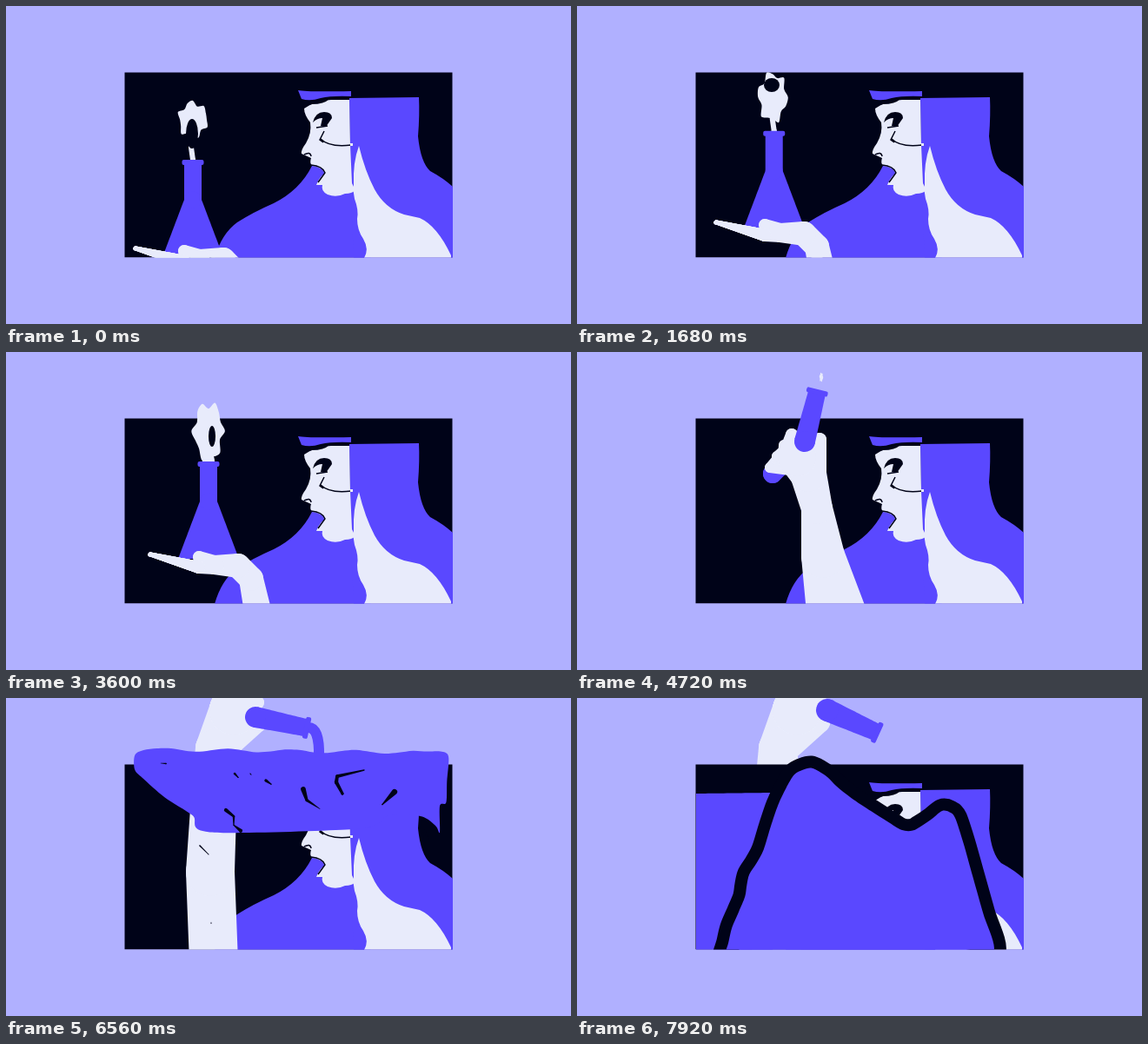
An HTML page with a canvas that plays this animation: 650x366 px, repeating every 8000 ms.

```html
<!DOCTYPE html>
<html lang="en">
<head>
<meta charset="utf-8">
<title>Potion</title>
<style>
html, body { margin: 0; width: 100%; height: 100%; overflow: hidden; background: #b0b0ff; }
canvas { display: block; }
</style>
</head>
<body>
<canvas id="stage" width="650" height="366"></canvas>
<script>
const ctx = document.getElementById('stage').getContext('2d');
const BG = '#b0b0ff', DARK = '#000318', PURPLE = '#5a48ff', LIGHT = '#e8ebfb';
const LOOP = 8000, STEP = 80;
const BOTTOM = 289.5;

// The woman never moves.
const woman = [
  [PURPLE, 'M240 290Q248 262 266 249Q285 237 308 227Q338 212 352 184L362 180 400 200 420 290Z'],
  [PURPLE, 'M395 106L475 105Q476 125 474 150Q477 180 488 190Q503 198 514 208V290H400L396 204Z'],
  [LIGHT, 'M343 118Q358 108 374 108H395L396 160 398 204 402 212Q398 216 390 216Q380 221 370 217Q362 213 364 206L357 206Q360 198 366 193Q366 186 352 184Q349 180 351 175L340 170Q339 166 345 158Q352 146 350 134Q343 125 343 118Z'],
  [LIGHT, 'M406 161Q413 190 424 211Q436 233 458 240L476 244Q496 253 512 287V290H412Q418 280 411 268Q404 258 404 245Q406 235 401 222Q399 214 400 205Q399 180 406 161Z'],
  [DARK, 'M341 116Q344 108 362 106L372 107Q366 113 352 113Z'],
  [PURPLE, 'M336 97Q345 99 397 98V104Q375 103 362 106Q350 110 340 107Z'],
  [DARK, 'M353 134Q356 122 366 122Q375 122 375 129L368 139 362 138 364 129Q358 129 353 134Z']
].map(([color, d]) => [color, new Path2D(d)]);
const lines = new Path2D('M357 140L370 138M366 144L361 154 365 157M362 153Q372 163 397 160M343 171Q350 167 351 173M351 183Q364 184 367 192L359 203');

const mix = (a, b, f) => a.map((v, i) => v + (b[i] - v) * f);
const unit = v => Math.max(0, Math.min(1, v));

function pose(times, shapes, t) {
  let i = 0;
  while (i < times.length - 2 && t >= times[i + 1]) i++;
  return mix(shapes[i], shapes[i + 1], unit((t - times[i]) / (times[i + 1] - times[i])));
}

// Smooth closed curve through [x, y] points; bend 0 gives straight sides.
function blob(pts, color, bend = 0.15) {
  const n = pts.length, at = i => pts[(i + n) % n];
  ctx.beginPath();
  ctx.moveTo(...pts[0]);
  pts.forEach((p, i) => {
    const q = at(i + 1), before = at(i - 1), after = at(i + 2);
    ctx.bezierCurveTo(
      p[0] + (q[0] - before[0]) * bend, p[1] + (q[1] - before[1]) * bend,
      q[0] - (after[0] - p[0]) * bend, q[1] - (after[1] - p[1]) * bend, ...q);
  });
  ctx.fillStyle = color;
  ctx.fill();
}

// Chain of [x, y, radius] joints with a tapered skin.
function limb(joints, color) {
  ctx.fillStyle = color;
  joints.forEach(([x, y, r], i) => {
    const [u, v, s] = joints[i + 1] || [x, y, r];
    const d = Math.hypot(u - x, v - y), a = Math.atan2(v - y, u - x);
    ctx.beginPath();
    if (d <= Math.abs(r - s)) ctx.arc(x, y, r, 0, 7);
    else {
      const b = Math.acos((r - s) / d);
      ctx.arc(x, y, r, a + b, a - b + 2 * Math.PI);
      ctx.arc(u, v, s, a - b, a + b);
    }
    ctx.fill();
  });
}

function oval(x, y, rx, ry, color) {
  ctx.fillStyle = color;
  ctx.beginPath();
  ctx.ellipse(x, y, rx, ry, 0, 0, 7);
  ctx.fill();
}

// Poses: hold, grip, lift, pour (twice), rest.
const poseTimes = [3600, 4720, 5760, 6240, 7040, 7920];
// Elbow, forearm, wrist, palm, knuckles, thumb, first and last finger.
const pourArm = [240,330,28, 235,200,28, 240,100,26, 240,58,22, 262,14,28, 288,28,12, 275,-5,7, 290,5,7];
const arms = [
  [296,330,17, 282,261,14, 267,246,14, 240,245,11, 222,248,7, 222,236,7, 166,233,2.5, 166,233,2.5],
  [305,330,38, 283,235,25, 276,180,18, 266,140,21, 253,121,22, 279,101,8, 222,133,6, 247,95,7],
  [305,312,42, 252,230,30, 255,160,28, 248,100,20, 256,54,26, 288,50,11, 236,31,7, 274,31,7],
  pourArm, pourArm,
  pourArm.map((v, i) => i % 3 ? v : v - 9)
];
// Mouth x, y, neck end x, y, end radius, base x, y, body size.
const pourFlask = [349,35, 287,22, 12, 287,22, 0];
const flasks = [
  [233,126, 233,172, 10, 233,215, 1],
  [277,43, 262,103, 12, 225,140, 0],
  [335,12, 285,45, 12, 232,44, 0],
  pourFlask, pourFlask,
  [348,41, 288,14, 13, 288,14, 0]
];

// How far below the held pose the hand still is.
const sink = t => Math.pow(unit(1 - t / 3600), 1.68);

function drawArm(t) {
  const k = sink(t);
  const flat = pose(poseTimes, arms, t), joints = [];
  for (let i = 0; i < flat.length; i += 3) joints.push([flat[i] - 17 * k, flat[i + 1] + 46 * k, flat[i + 2]]);
  const [palm, knuckles, thumb, first, last] = joints.slice(3);

  const [mx, my, ex, ey, r, bx, by, size] = pose(poseTimes, flasks, t);
  const long = Math.hypot(ex - mx, ey - my);
  const inFlask = draw => {
    ctx.save();
    ctx.translate(mx - 18 * k, my + 51 * k);
    ctx.rotate(Math.atan2(ey - my, ex - mx) - Math.PI / 2);
    draw();
    ctx.restore();
  };

  limb([[ex - 18 * k, ey + 51 * k, r - 1], [bx - 18 * k, by + 51 * k, 11]], PURPLE);
  inFlask(() => blob([[-10, long], [10, long], [10 + 25 * size, long + 66 * size], [-10 - 25 * size, long + 66 * size]], PURPLE, 0));
  limb(joints.slice(0, 5), LIGHT);
  limb([palm, thumb], LIGHT);
  for (let i = 0; i < 4; i++) limb([knuckles, mix(first, last, i / 3)], LIGHT);
  inFlask(() => {
    blob([[-10, 2], [10, 2], [r, long], [-r, long]], PURPLE, 0);
    oval(0, long, r, r, PURPLE);
    ctx.beginPath();
    ctx.roundRect(-12.5, 0, 25, 6, 2);
    ctx.fill();
  });
}

// Centre, radii, hole centre, hole radii, tail width.
const smokeTimes = [0, 1680, 3600, 4720];
const smoke = [
  [215,131, 16,20, 214,147, 7,17, 3],
  [225,105, 16,27, 224,91, 9,8, 3],
  [233,91, 17,31, 237,97, 4,12, 7],
  [281,29, 2,5, 281,29, 0,0, 0]
];

function drawSmoke(t) {
  if (t > 4800) return;
  const [x, y, rx, ry, hx, hy, hrx, hry, tail] = pose(smokeTimes, smoke, t);
  const k = sink(t), mx = 233 - 18 * k, my = 126 + 51 * k;
  if (t < 4000) limb([[mx - 2, my - 14, tail], [mx, my, tail]], LIGHT);
  const puff = Array.from({ length: 16 }, (_, i) => {
    const a = i / 8 * Math.PI, w = 1 + 0.17 * Math.sin(i * 2.3 + t / 240);
    return [x + rx * w * Math.cos(a), y + ry * w * Math.sin(a)];
  });
  blob(puff, LIGHT);
  if (t < 4000) oval(hx, hy, hrx, hry, DARK);
}

function drawScene() {
  ctx.fillStyle = DARK;
  ctx.fillRect(136.5, 76.5, 377, BOTTOM - 76.5);
  for (const [color, path] of woman) {
    ctx.fillStyle = color;
    ctx.fill(path);
  }
  ctx.strokeStyle = DARK;
  ctx.lineWidth = 1.5;
  ctx.stroke(lines);
  ctx.fillStyle = LIGHT;
  ctx.fillRect(396, 158, 3, 3);
}

// Liquid outlines run clockwise from the bottom left.
const spill = [[222, 300], [200, 250], [165, 197], [137, 140], [127, 115], [127, 72], [138, 57]];
for (let x = 155; x < 505; x += 18) spill.push([x, 55 + (x - 140) * 0.024 + 5 * Math.sin(x / 12.7 - 2)]);
spill.push([514, 61], [524, 76], [522, 150], [521, 212], [513, 222], [513, 300],
  [508, 282], [493, 256], [472, 249], [446, 252], [434, 275], [400, 292]);

const ridge = [[170, 300], [178, 265], [193, 230], [197, 205], [213, 180], [229, 128], [247, 90], [266, 79], [284, 87], [305, 108],
  [350, 138], [380, 156], [402, 144], [424, 127], [437, 140], [458, 215], [482, 300], [400, 310], [300, 310], [200, 310]];
const hill = spill.map((_, n) => {
  const at = n / spill.length * ridge.length, i = Math.floor(at);
  return mix(ridge[i], ridge[(i + 1) % ridge.length], at - i);
});

const gaps = [
  [[178, 75, 2], [184, 78, 5]],
  [[263, 87, 9], [267, 118, 4]],
  [[281, 87, 4], [282, 95, 3]],
  [[299, 95, 12], [305, 124, 4]],
  [[342, 105, 20], [346, 193, 11], [361, 263, 2]],
  [[412, 83, 5], [381, 133, 13], [380, 180, 15], [387, 272, 11]],
  [[447, 108, 22], [433, 210, 5]],
  [[481, 153, 13], [486, 216, 4]],
  [[253, 129, 15], [262, 180, 9], [262, 250, 4], [270, 295, 14]],
  [[223, 170, 6], [233, 240, 3]],
  [[236, 258, 2], [236, 267, 3]]
];

function drawLiquid(t) {
  if (t <= 6160) return;
  const grow = unit((t - 6160) / 880), f = unit((t - 7040) / 880);
  const spread = unit(grow * 2), fall = Math.pow(grow, 1.2);
  const outline = spill.map(([x, y], i) => mix([360 + (x - 360) * spread, 62 + (y - 62) * fall], hill[i], f));
  if (f > 0) {
    const early = [[137, 140], [225, 60], [225, 290], [216, 290], [163, 200]];
    const late = [[137, 110], [225, 109], [225, 290], [137, 290], [137, 200]];
    blob(early.map((p, i) => mix(p, late[i], f)), PURPLE, 0);
  }
  blob(outline, PURPLE);
  if (f > 0) {
    ctx.strokeStyle = DARK;
    ctx.lineWidth = 28 * f;
    ctx.stroke();
    blob(outline, PURPLE);
  }
  const open = unit((t - 6480) / 560) * unit(1 - f * 2);
  if (!open) return;
  for (const gap of gaps) {
    const top = gap[0][1];
    limb(gap.map(([x, y, r]) => [x, top + (y - top) * open + 60 * f, r * open]), DARK);
  }
}

function drawStream(t) {
  if (t <= 6160 || t >= 7280) return;
  ctx.strokeStyle = PURPLE;
  ctx.lineWidth = 12 * unit((7280 - t) / 240);
  ctx.beginPath();
  ctx.moveTo(347, 34);
  ctx.quadraticCurveTo(361, 33, 360, 68);
  ctx.stroke();
}

function draw(now) {
  const t = Math.floor(now % LOOP / STEP) * STEP;
  const behind = t >= 6960;
  ctx.fillStyle = BG;
  ctx.fillRect(0, 0, 650, 366);
  ctx.save();
  ctx.beginPath();
  ctx.rect(0, 0, 650, BOTTOM);
  ctx.clip();
  if (behind) drawArm(t);
  drawScene();
  drawSmoke(t);
  if (!behind) drawArm(t);
  drawLiquid(t);
  drawStream(t);
  ctx.restore();
}

const begin = performance.now();
function tick() {
  draw(performance.now() - begin);
  requestAnimationFrame(tick);
}
tick();
</script>
</body>
</html>
```
